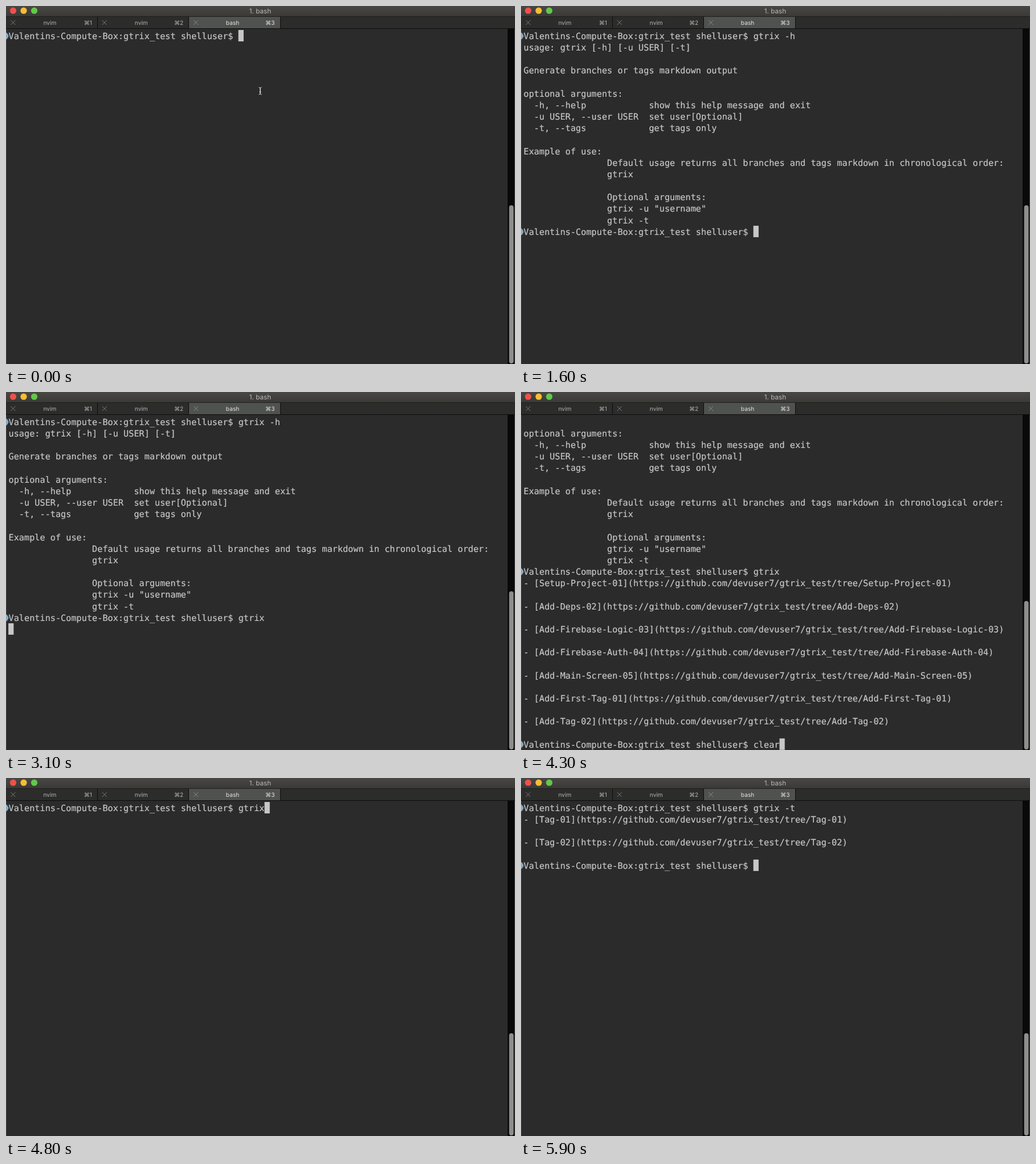
These frames come from a looping animation (893x627 px, 6000 ms). An HTML page:

```html
<!DOCTYPE html>
<html lang="en">
<head>
<meta charset="utf-8">
<title>Terminal</title>
<style>
html, body { margin: 0; width: 100%; height: 100%; overflow: hidden; background: #2b2b2b; }
svg { display: block; width: 893px; height: 627px; text-rendering: geometricPrecision; }
.rows text { font: 15.235px "DejaVu Sans Mono", monospace; fill: #c7c7c7; stroke: #c7c7c7; stroke-width: .2px; white-space: pre; }
.ui { font: 10.2px Inter, "DejaVu Sans", sans-serif; fill: #b4b4b3; }
.ui .on { fill: #e4e4e3; }
.ui .title { font-size: 11.7px; fill: #b9b8b6; }
</style>
</head>
<body>
<svg viewBox="0 0 893 627">
  <defs>
    <linearGradient id="bar" x2="0" y2="1">
      <stop stop-color="#484744"/><stop offset="1" stop-color="#3a3937"/>
    </linearGradient>
  </defs>
  <rect width="893" height="627" fill="#2b2b2b"/>
  <rect width="893" height="19" fill="url(#bar)"/>
  <rect y="18" width="893" height="1" fill="#1c1c1b"/>
  <rect y="19" width="893" height="20" fill="#2c2c2b"/>
  <rect x="321" y="19" width="160" height="20" fill="#505250"/>
  <path d="M160.5 19v20M320.5 19v20M481.5 19v20M0 39.5h893" stroke="#0d0d0d"/>
  <circle cx="12.5" cy="8.2" r="5.6" fill="#ee514a"/>
  <circle cx="31" cy="8.2" r="5.6" fill="#f6be32"/>
  <circle cx="49.5" cy="8.2" r="5.6" fill="#62c84a"/>
  <g class="ui" id="ui">
    <text class="title" id="title" x="446" y="13" text-anchor="middle"></text>
  </g>
  <rect x="880" y="40" width="13" height="587" fill="#090909"/>
  <rect id="thumb" x="882.7" width="7.8" rx="3.9" fill="#8e8e8c"/>
  <path d="M.5 40v587M892.5 40v587" stroke="#484848"/>
  <g class="rows" id="rows"></g>
  <rect id="cursor" width="9.2" height="20" fill="#c7c7c7"/>
  <path id="mouse" d="M443.5 142.5q2.5 0 2.5 2v8.5q0 2-2.5 2M448.5 142.5q-2.5 0-2.5 2v8.5q0 2 2.5 2M444.5 150.5h3" fill="none" stroke="#dedede"/>
</svg>
<script>
const $ = id => document.getElementById(id);
const LOOP = 6000, ROWS = 29, LEFT = 4.5, TOP = 42, CELL = 9.17, LINE = 20.17;
const prompt = "Valentins-Compute-Box:gtrix_test shelluser$ ";

function add(parent, tag, attrs, text = "") {
  const el = document.createElementNS("http://www.w3.org/2000/svg", tag);
  for (const key in attrs) el.setAttribute(key, attrs[key]);
  el.textContent = text;
  return parent.appendChild(el);
}

const tabs = [0, 1, 2].map(i => {
  const x = 160.3 * i, on = i === 2 ? "on" : "";
  add($("ui"), "path", { d: `M${x + 8.5} 25l8 8m0-8l-8 8`, stroke: on ? "#868886" : "#7b7b7a", fill: "none" });
  add($("ui"), "text", { x: x + 151, y: 33, "text-anchor": "end", class: on }, "⌘" + (i + 1));
  return add($("ui"), "text", { x: x + 77, y: 33, "text-anchor": "middle", class: on }, "nvim");
});

const rows = Array.from({ length: ROWS }, (_, i) => {
  const y = TOP + i * LINE;
  return {
    mark: add($("rows"), "path", { d: `M0 ${y + 4}q4 3 4.5 6.5q-.5 3.5-4.5 6.5z`, fill: "#86abc6" }),
    text: add($("rows"), "text", { x: LEFT, y: y + 15.8 })
  };
});

const pad = " ".repeat(16);
const help = [
  "usage: gtrix [-h] [-u USER] [-t]",
  "",
  "Generate branches or tags markdown output",
  "",
  "optional arguments:",
  "  -h, --help            show this help message and exit",
  "  -u USER, --user USER  set user[Optional]",
  "  -t, --tags            get tags only",
  "",
  "Example of use:",
  pad + "Default usage returns all branches and tags markdown in chronological order:",
  pad + "gtrix",
  "",
  pad + "Optional arguments:",
  pad + 'gtrix -u "username"',
  pad + "gtrix -t"
];
const links = names => names.flatMap(n =>
  [`- [${n}](https://github.com/devuser7/gtrix_test/tree/${n})`, ""]);
const branches = links(["Setup-Project-01", "Add-Deps-02", "Add-Firebase-Logic-03",
  "Add-Firebase-Auth-04", "Add-Main-Screen-05", "Add-First-Tag-01", "Add-Tag-02"]);
const tags = links(["Tag-01", "Tag-02"]);

const helped = [prompt + "gtrix -h", ...help];
const listed = [...helped, prompt + "gtrix", ...branches];
const tagged = [prompt + "gtrix -t", ...tags];

// Each step: start time, lines before the last one, last line, thumb top, running program
const steps = [];
const step = (at, before, last, thumb = 349, job = "bash") => steps.push({ at, lines: [...before, last], thumb, job });
const type = (at, before, states, thumb) =>
  states.forEach((s, i) => step(at + i * 100, before, prompt + s, thumb));

type(0, [], [""]);
type(200, [], ["g", "gtr", "gtrix", "gtrix -", "gtrix -h"]);
step(700, helped.slice(0, 1), "", 349, "Python");
step(800, helped, prompt, 349, "Python");
type(900, helped, [""]);
type(2700, helped, ["g", "gt", "gtri", "gtrix"]);
step(3100, [...helped, prompt + "gtrix"], "");
type(3200, listed, [""], 366);
type(4200, listed, ["cle", "clear"], 366);
type(4400, [], ["", "g", "gt", "gtri", "gtrix", "gtrix -", "gtrix -t"], 447);
step(5100, tagged.slice(0, 1), "", 447);
type(5200, tagged, [""], 447);

function show({ at, lines, thumb, job }) {
  const view = lines.slice(-ROWS), end = view.length - 1;
  rows.forEach(({ mark, text }, i) => {
    const line = view[i] || "";
    text.textContent = line;
    mark.style.display = line.startsWith(prompt) ? "" : "none";
  });
  $("cursor").setAttribute("x", LEFT + view[end].length * CELL - 0.3);
  $("cursor").setAttribute("y", TOP + end * LINE);
  $("thumb").setAttribute("y", thumb);
  $("thumb").setAttribute("height", 626 - thumb);
  $("title").textContent = "1. " + job;
  tabs[2].textContent = job;
  $("mouse").style.display = at < 200 ? "" : "none";
}

let current;
const start = performance.now();
function tick(now) {
  const t = Math.max(0, now - start) % LOOP;
  const next = steps.findLast(s => s.at <= t);
  if (next !== current) show(current = next);
  requestAnimationFrame(tick);
}
tick(start);
</script>
</body>
</html>
```
